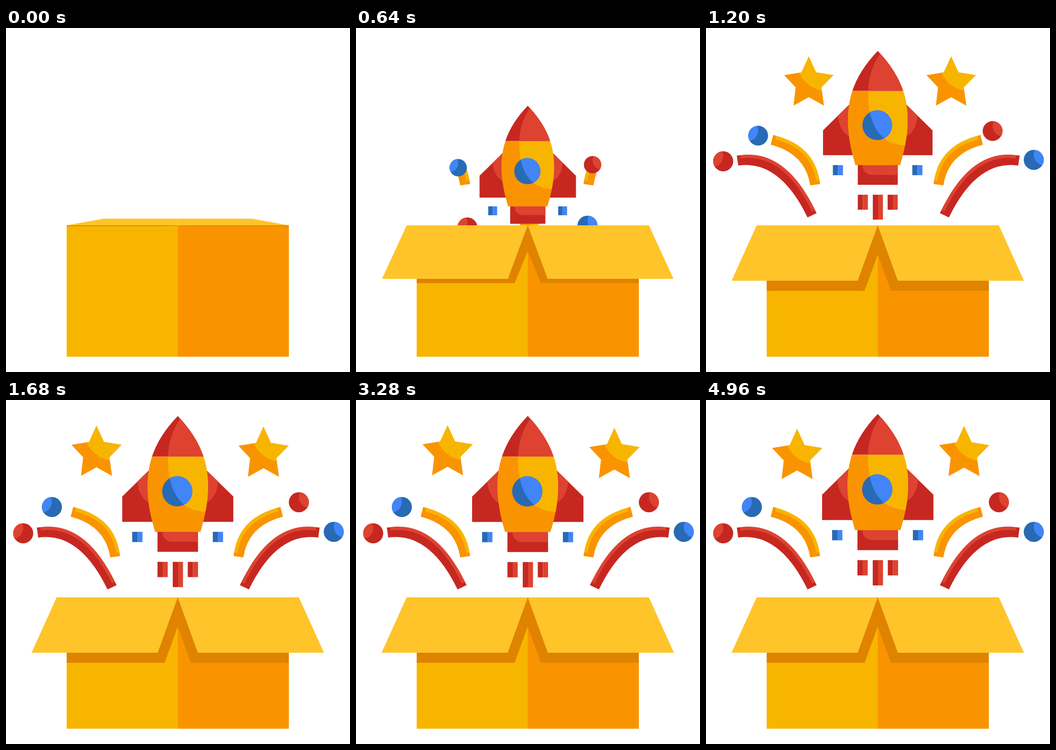
These frames come from a looping animation (720x720 px, 5 s). An HTML page:

```html
<!DOCTYPE html>
<html lang="en">
<head>
<meta charset="utf-8">
<title>Rocket box</title>
<style>
  html, body { margin: 0; width: 100%; height: 100%; overflow: hidden; background: #fff; }
  svg { display: block; width: 100vw; height: 100vh; }
  .red { --dark: #c62821; --light: #dd4330; }
  .blue { --dark: #286ab4; --light: #4285f8; }
  .gold { --dark: #f99400; --light: #f8b500; }
  .d { fill: var(--dark); }
  .l { fill: var(--light); }
  .ribbon path { fill: none; }
  .ribbon path:first-child { stroke: var(--dark); stroke-width: 21; }
  .ribbon path:last-child { stroke: var(--light); stroke-width: 7; }
</style>
</head>
<body>
<svg viewBox="0 0 720 720">
  <defs>
    <clipPath id="disc"><circle r="21"/></clipPath>
    <g id="ball">
      <circle class="d" r="21"/>
      <circle class="l" cx="-23" cy="-11" r="23" clip-path="url(#disc)"/>
    </g>
    <path id="starShape" d="M0-56 15.5-22 52.5-16 27 10 32.5 49 0 31-32.5 49-28 10-52.5-16-15.5-22Z"/>
    <clipPath id="starClip"><use href="#starShape"/></clipPath>
    <g id="star" class="gold">
      <use href="#starShape" class="d"/>
      <circle class="l" cx="37" cy="-45" r="62" clip-path="url(#starClip)"/>
    </g>
    <path id="bodyShape" d="M305.5 117C290.500 163 293.500 215 312 275H407C425.500 215 428.500 163 413.500 117Z"/>
    <clipPath id="bodyClip"><use href="#bodyShape"/></clipPath>
    <path id="shine" d="M339 117C338 180 358 230 417 233H430V117Z"/>
    <clipPath id="shineClip"><use href="#shine"/></clipPath>
    <g id="fin">
      <path class="d" d="M298 147 243 201V254H312V147Z"/>
      <path class="l" d="M298 147 275 169.500Q277 202 300 215H312V147Z"/>
    </g>
    <g id="chip">
      <path class="d" d="M0 0H11V21.500H0Z"/>
      <path class="l" d="M11 0H21.500V21.500H11Z"/>
    </g>
    <g id="jet">
      <path class="d" d="M0 0H11V32H0Z"/>
      <path class="l" d="M11 0H21.500V32H11Z"/>
    </g>
  </defs>

  <use id="starL" href="#star"/>
  <use id="starR" href="#star"/>

  <g id="outer" class="ribbon red">
    <path pathLength="1" d="M222 392Q160 264 66 277.500"/>
    <path pathLength="1" d="M225 382.500Q164 257 72.300 269.800"/>
  </g>
  <use href="#outer" transform="matrix(-1 0 0 1 721 0)"/>
  <g id="inner" class="ribbon gold">
    <path pathLength="1" d="M228.500 328Q217.500 254.500 138 234"/>
    <path pathLength="1" d="M234 319Q223 249.500 146 229.500"/>
  </g>
  <use href="#inner" transform="matrix(-1 0 0 1 715 0)"/>
  <use id="innerL" class="blue" href="#ball"/>
  <use id="innerR" class="red" href="#ball"/>
  <use id="outerL" class="red" href="#ball"/>
  <use id="outerR" class="blue" href="#ball"/>

  <g id="rocket">
    <g class="red">
      <use href="#fin"/>
      <use href="#fin" transform="matrix(-1 0 0 1 719 0)"/>
      <path class="d" d="M317 275H402V317H317Z"/>
      <path class="l" d="M327 275Q329 296 350 296H402V275Z"/>
      <use href="#jet" x="317" y="338"/>
      <use href="#jet" x="380.500" y="338"/>
      <use href="#jet" transform="translate(349 338) scale(1 1.656)"/>
    </g>
    <g class="gold">
      <use href="#bodyShape" class="d"/>
      <g clip-path="url(#bodyClip)"><use href="#shine" class="l"/></g>
    </g>
    <g class="red">
      <path class="d" d="M359.500 32Q399 73 413.500 117H305.500Q320 73 359.500 32Z"/>
      <path class="l" d="M364.500 37.500Q399.500 76 413.500 117H339Q340 75 364.500 37.500Z"/>
    </g>
    <g class="blue">
      <circle class="d" cx="358.500" cy="190" r="31.700"/>
      <circle class="l" cx="358.500" cy="190" r="31.700" clip-path="url(#shineClip)"/>
      <use href="#chip" x="264" y="275"/>
      <use href="#chip" x="433" y="275"/>
    </g>
  </g>

  <path fill="#f8b500" d="M127 413.500H360V688H127Z"/>
  <path fill="#f99400" d="M359.500 413.500H592V688H359.500Z"/>
  <path id="shade" fill="#df8300"/>
  <path id="flap" fill="#ffc42a"/>
  <use href="#flap" transform="matrix(-1 0 0 1 719 0)"/>
</svg>
<script>
const LOOP = 5000, STEP = 40;
const $ = id => document.getElementById(id);

const part = (t, from, to) => Math.min(1, Math.max(0, (t - from) / (to - from)));
const easeOut = (t, from, to, power) => 1 - (1 - part(t, from, to)) ** power;
const smooth = (t, from, to) => {
  const u = part(t, from, to);
  return u * u * (3 - 2 * u);
};
const mix = (a, b, u) => a + (b - a) * u;
const quad = (a, b, c, u) => mix(mix(a, b, u), mix(b, c, u), u);

// Hovering: fades in as the launch ends; speed in radians per second.
const hover = (t, size, speed, phase) =>
  size * part(t, 1200, 2000) * Math.sin(phase + speed * (t - 2280) / 1000);

const place = (id, x, y, sx, sy = sx) =>
  $(id).setAttribute("transform", `translate(${x} ${y}) scale(${sx} ${sy})`);
const trim = (id, p) => {
  for (const path of $(id).children) path.setAttribute("stroke-dasharray", `${p} 2`);
};

function drawRocket(t) {
  const below = 450 / (1 + Math.exp((t - 433) / 232));
  const tip = 32 + below + hover(t, -3, 9.84, 0);
  $("rocket").setAttribute("transform",
    `translate(359.5 ${tip}) scale(${1 - below / 978}) translate(-359.5 -32)`);
}

function drawStars(t) {
  const size = easeOut(t, 540, 1440, 3);
  const across = easeOut(t, 630, 1830, 3);
  const y = mix(596, 112, easeOut(t, 540, 1440, 4));
  place("starL", mix(361, 190.4, across) + hover(t, 2.6, 12.7, .38),
    y + hover(t, 5.6, 12.9, -.95), size);
  place("starR", mix(364, 538.3, across) + hover(t, 2.7, 8.2, -.73),
    y + hover(t, 4.5, 9.5, -.67), size);
}

function drawStreamers(t) {
  const u = easeOut(t, 440, 1840, 4), r = mix(.75, 1, u);
  const ix = quad(238, 250, 96, u), iy = quad(440, 235, 224, u);
  place("innerL", ix, iy, r);
  place("innerR", 709 - ix, iy - 3 - 7 * u, -r, r);
  trim("inner", easeOut(t, 560, 1160, 1.6));

  const v = easeOut(t, 600, 1160, 2);
  const ox = quad(252, 190, 36, v), oy = quad(472, 258, 279, v);
  place("outerL", ox, oy, 1);
  place("outerR", 717 + 5 * v - ox, oy - 4 + v, -1, 1);
  trim("outer", easeOut(t, 690, 1170, 1.6));
}

function drawBox(t) {
  const up = smooth(t, 0, 280), down = smooth(t, 280, 670);
  const turn = (shut, upright, open) => mix(mix(shut, upright, up), open, down);
  $("flap").setAttribute("d",
    `M${mix(127, 106, up)} 413H359.5L${turn(359.5, 340, 317.5)} ${turn(399, 297, 529)}` +
    `H${turn(205, 108, 53.5)}Z`);

  const p = mix(.012, 1, smooth(t, 420, 700)), low = 413 + 137 * p, fold = 413 + 61 * p;
  $("shade").setAttribute("d",
    `M127 413V${low}H332L359.5 ${fold} 387 ${low}H592V413Z`);
}

const start = performance.now();
function tick() {
  const now = (performance.now() - start) % LOOP;
  const t = Math.floor(now / STEP) * STEP;
  for (const draw of [drawRocket, drawStars, drawStreamers, drawBox]) draw(t);
  requestAnimationFrame(tick);
}
tick();
</script>
</body>
</html>
```
